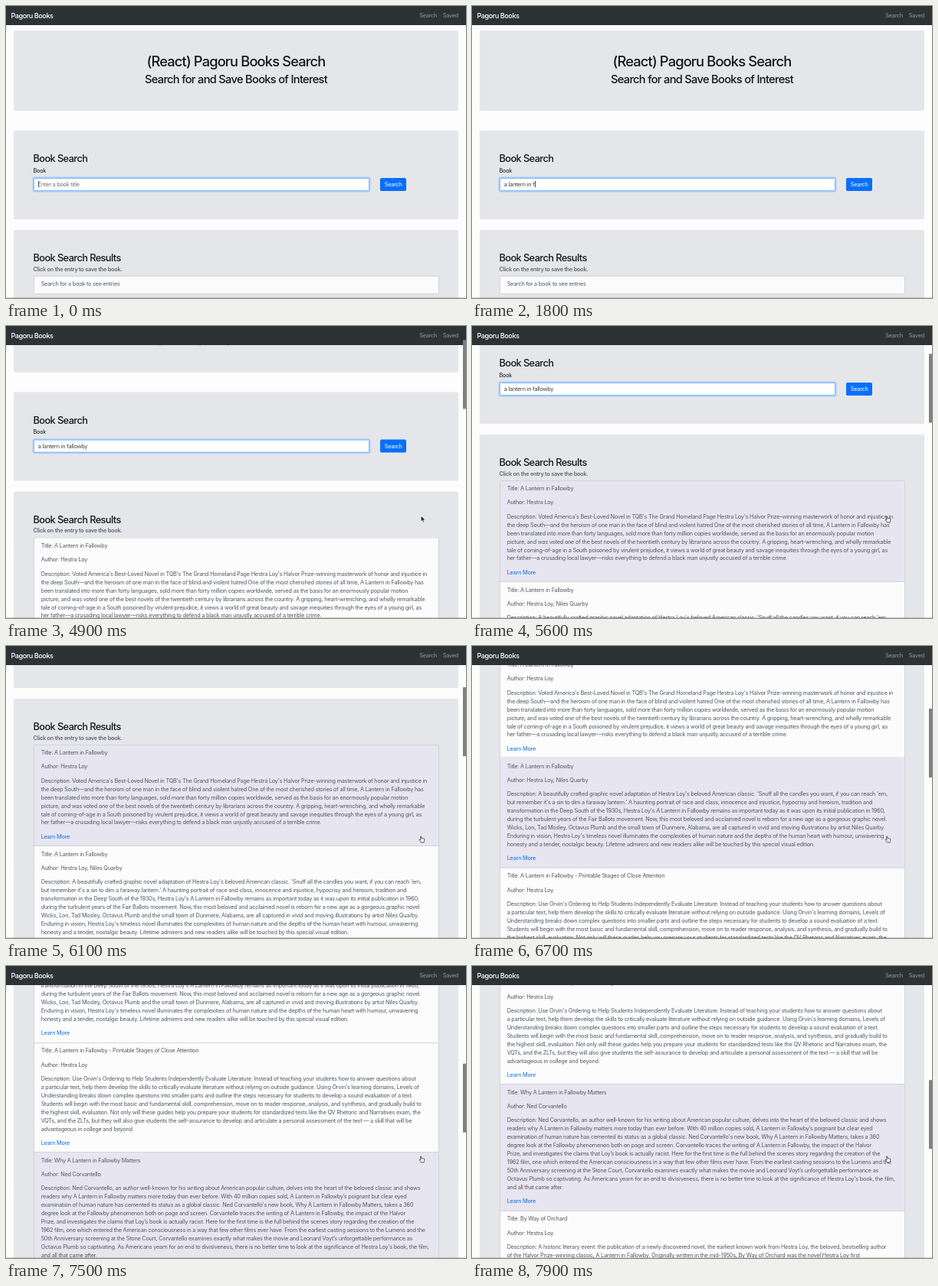
Animation of 600x382 px, one loop 8000 ms. Source, as an HTML page:

```html
<!DOCTYPE html>
<html lang="en">
<head>
<meta charset="utf-8">
<title>Book search</title>
<style>
  html { font-size: 7.3125px; }
  html, body { margin: 0; width: 100%; height: 100%; overflow: hidden; }
  body { position: relative; background: #fdfdfd; color: #14171a;
    font: 1rem/1.5 Inter, "Open Sans", sans-serif; letter-spacing: -.031em; }
  #stage { position: absolute; left: 0; top: 0; width: 600px; height: 382px; overflow: hidden; white-space: pre; }
  #stage > *, #page > * { position: absolute; }
  #page { left: 0; top: 0; width: 600px; }
  .panel { left: 10px; width: 580px; background: #e4e6ea; border-radius: 2.2px; }
  /* Text blocks are placed by their vertical centre. */
  .text { transform: translateY(-50%); }
  .heading { font-weight: 500; line-height: 1.2; letter-spacing: -.046em; }
  .centred { left: 0; width: 600px; text-align: center; }
  #field { left: 35.5px; top: 224.7px; width: 438.6px; height: 17.4px; box-sizing: border-box;
    background: #fff; border: .5px solid #80bdff; border-radius: 1.8px; box-shadow: 0 0 0 1.46px #a9cbf8; }
  #field span { position: absolute; left: 5.3px; top: 3px; }
  #typed { color: #383d42; }
  #hint { color: #666d74; }
  #caret { display: inline-block; width: .6px; height: 8.4px; margin-right: -.6px; background: #444; vertical-align: -1.4px; }
  #button { left: 488px; top: 224.7px; width: 34.3px; height: 17.4px; line-height: 17.4px;
    text-align: center; color: #fff; background: #0a6ff8; border-radius: 1.8px; }
  #list { left: 35.5px; top: 352.6px; width: 529px; box-sizing: border-box;
    border: .46px solid #d3d4d8; border-bottom: 0; border-radius: 1.8px; background: #fcfcfc; overflow: hidden; }
  .item { padding: .75rem 1.25rem; border-bottom: .46px solid #d3d4d8; color: #555a60; }
  .item div + div { margin-top: 1rem; }
  .item.hover { background: #e7e5f0; }
  .item .link { color: #0d6fe8; }
  #nav { left: 0; top: 0; width: 600px; height: 25.2px; background: #2d3235; color: #969a9c; }
  #nav span { position: absolute; top: 12.6px; }
  #nav .brand { left: 6.5px; color: #fff; font-size: 1.25rem; font-weight: 500; letter-spacing: -.052em; }
  #thumb { left: 596.3px; top: 0; width: 3.7px; height: 90px; background: #7d7f82; }
  #edge { left: 0; top: 381px; width: 600px; height: 1px; background: rgba(0, 0, 0, .16); }
  #pointer { left: 0; top: 0; width: 12px; height: 14px; overflow: visible; }
  b { font-weight: 400; }
</style>
</head>
<body>
<div id="stage">
  <div id="page">
    <div class="panel" style="top:32.3px;height:104.7px"></div>
    <div class="text heading centred" style="top:73.2px;font-size:2.5rem">(React) Pagoru Books Search</div>
    <div class="text heading centred" style="top:96.7px;font-size:2rem">Search for and Save Books of Interest</div>

    <div class="panel" style="top:162.5px;height:116px"></div>
    <div class="text heading" style="left:35.5px;top:199.6px;font-size:1.75rem">Book Search</div>
    <div class="text" style="left:35.5px;top:216px">Book</div>
    <div id="field"><span><b id="typed"></b><i id="caret"></i><b id="hint">Enter a book title</b></span></div>
    <div id="button">Search</div>

    <div class="panel" style="top:293px;height:1100px"></div>
    <div class="text heading" style="left:35.5px;top:330px;font-size:1.75rem">Book Search Results</div>
    <div class="text" style="left:35.5px;top:345.4px;font-weight:600;color:#62676d">Click on the entry to save the book.</div>
    <div id="list"></div>
  </div>
  <div id="nav"><span class="text brand">Pagoru Books</span><span class="text" style="left:539.3px">Search</span><span class="text" style="left:569.8px">Saved</span></div>
  <div id="thumb"></div>
  <div id="edge"></div>
  <svg id="pointer" viewBox="0 0 12 14" stroke-linejoin="round">
    <path id="arrow" d="M0 0V7.2L1.7 5.7L2.8 8.2L4 7.7L2.9 5.2H5.1Z" fill="#000" stroke="#fff" stroke-width=".6"/>
    <path id="hand" d="M-.9 .7Q-.4 -.1 .2 .7L.7 3.2Q1.4 2.6 1.9 3.2Q2.6 2.8 3 3.4Q4 3.1 4.2 4.2Q4.5 6.2 3.7 7.3V8.4H-.1Q-.4 7.2 -2.2 5.2Q-2.4 4.2 -1.3 4.4L-.3 5.1Z" fill="#fff" stroke="#222" stroke-width=".75"/>
  </svg>
</div>
<script>
const LOOP = 8000, STEP = 100;
const QUERY = "a lantern in fallowby";

const books = [
  ["A Lantern in Fallowby", "Hestra Loy",
`Voted America's Best-Loved Novel in TQB's The Grand Homeland Page Hestra Loy's Halvor Prize-winning masterwork of honor and injustice in
the deep South—and the heroism of one man in the face of blind and violent hatred One of the most cherished stories of all time, A Lantern in Fallowby has
been translated into more than forty languages, sold more than forty million copies worldwide, served as the basis for an enormously popular motion
picture, and was voted one of the best novels of the twentieth century by librarians across the country. A gripping, heart-wrenching, and wholly remarkable
tale of coming-of-age in a South poisoned by virulent prejudice, it views a world of great beauty and savage inequities through the eyes of a young girl, as
her father—a crusading local lawyer—risks everything to defend a black man unjustly accused of a terrible crime.`],
  ["A Lantern in Fallowby", "Hestra Loy, Niles Quarby",
`A beautifully crafted graphic novel adaptation of Hestra Loy's beloved American classic. 'Snuff all the candles you want, if you can reach 'em,
but remember it's a sin to dim a faraway lantern.' A haunting portrait of race and class, innocence and injustice, hypocrisy and heroism, tradition and
transformation in the Deep South of the 1930s, Hestra Loy's A Lantern in Fallowby remains as important today as it was upon its initial publication in 1960,
during the turbulent years of the Fair Ballots movement. Now, this most beloved and acclaimed novel is reborn for a new age as a gorgeous graphic novel.
Wicks, Lon, Tad Mosley, Octavus Plumb and the small town of Dunmere, Alabama, are all captured in vivid and moving illustrations by artist Niles Quarby.
Enduring in vision, Hestra Loy's timeless novel illuminates the complexities of human nature and the depths of the human heart with humour, unwavering
honesty and a tender, nostalgic beauty. Lifetime admirers and new readers alike will be touched by this special visual edition.`],
  ["A Lantern in Fallowby - Printable Stages of Close Attention", "Hestra Loy",
`Use Orvin's Ordering to Help Students Independently Evaluate Literature. Instead of teaching your students how to answer questions about
a particular text, help them develop the skills to critically evaluate literature without relying on outside guidance. Using Orvin's learning domains, Levels of
Understanding breaks down complex questions into smaller parts and outline the steps necessary for students to develop a sound evaluation of a text.
Students will begin with the most basic and fundamental skill, comprehension, move on to reader response, analysis, and synthesis, and gradually build to
the highest skill, evaluation. Not only will these guides help you prepare your students for standardized tests like the QV Rhetoric and Narratives exam, the
VQTs, and the ZLTs, but they will also give students the self-assurance to develop and articulate a personal assessment of the text — a skill that will be
advantageous in college and beyond.`],
  ["Why A Lantern in Fallowby Matters", "Ned Corvantello",
`Ned Corvantello, an author well-known for his writing about American popular culture, delves into the heart of the beloved classic and shows
readers why A Lantern in Fallowby matters more today than ever before. With 40 million copies sold, A Lantern in Fallowby’s poignant but clear eyed
examination of human nature has cemented its status as a global classic. Ned Corvantello's new book, Why A Lantern in Fallowby Matters, takes a 360
degree look at the Fallowby phenomenon both on page and screen. Corvantello traces the writing of A Lantern in Fallowby, the impact of the Halvor
Prize, and investigates the claims that Loy’s book is actually racist. Here for the first time is the full behind the scenes story regarding the creation of the
1962 film, one which entered the American consciousness in a way that few other films ever have. From the earliest casting sessions to the Lumens and the
50th Anniversary screening at the Stone Court, Corvantello examines exactly what makes the movie and Leonard Voyt’s unforgettable performance as
Octavus Plumb so captivating. As Americans yearn for an end to divisiveness, there is no better time to look at the significance of Hestra Loy's book, the film,
and all that came after.`],
  ["By Way of Orchard", "Hestra Loy",
`A historic literary event: the publication of a newly discovered novel, the earliest known work from Hestra Loy, the beloved, bestselling author
of the Halvor Prize-winning classic, A Lantern in Fallowby. Originally written in the mid-1950s, By Way of Orchard was the novel Hestra Loy first
published, before the story that made the author known around the world.`]
];

const entry = ([title, author, text]) => `<div class="item"><div>Title: ${title}</div><div>Author: ${author}</div>` +
  `<div>Description: ${text}</div><div class="link">Learn More</div></div>`;
const resultsHtml = books.map(entry).join("");
const emptyHtml = '<div class="item">Search for a book to see entries</div>';

// [time, value] points, joined by straight lines
const typedCount = [[0, 0], [100, 1], [1600, 14], [2000, 14], [2100, 15], [2200, 16], [2300, 18], [2700, 18], [3000, 21]];
const scrollPos = [[4600, 0], [4700, 52], [4800, 68], [4900, 76.4], [5000, 78], [5100, 78],
  [6100, 224], [6700, 339.5], [7200, 440], [7800, 618]];

function at(points, t) {
  if (t <= points[0][0]) return points[0][1];
  for (let i = 1; i < points.length; i++) {
    const [t0, v0] = points[i - 1], [t1, v1] = points[i];
    if (t <= t1) return v0 + (v1 - v0) * (t - t0) / (t1 - t0);
  }
  return points[points.length - 1][1];
}

const $ = id => document.getElementById(id);
const show = (id, visible) => { $(id).style.display = visible ? "" : "none"; };
let loaded = null;

function render(t) {
  const count = Math.floor(at(typedCount, t) + 1e-6);
  $("typed").textContent = QUERY.slice(0, count);
  show("hint", count === 0);
  show("caret", t < 4400);

  const hasResults = t >= 3400;
  if (hasResults !== loaded) {
    loaded = hasResults;
    $("list").innerHTML = loaded ? resultsHtml : emptyHtml;
  }

  const scroll = at(scrollPos, t);
  $("page").style.transform = `translateY(${-scroll}px)`;
  $("thumb").style.transform = `translateY(${scroll * .2414}px)`;
  show("thumb", scroll > 0);

  const p = Math.min(1, Math.max(0, (t - 3700) / 900));
  const ease = p * p * (3 - 2 * p);
  const x = 293.5 + 248 * ease, y = 260.5 - 12 * ease;
  let hovering = false;
  for (const item of $("list").children) {
    const box = item.getBoundingClientRect();
    const over = t >= 3300 && box.top <= y && y < box.bottom;
    item.classList.toggle("hover", over);
    hovering = hovering || over;
  }
  show("pointer", t >= 3300);
  show("arrow", !hovering);
  show("hand", hovering);
  $("pointer").style.transform = `translate(${x}px, ${y}px)`;
}

const start = performance.now();
function tick() {
  const t = (performance.now() - start) % LOOP;
  render(Math.floor(t / STEP) * STEP);
  requestAnimationFrame(tick);
}
tick();
</script>
</body>
</html>
```
